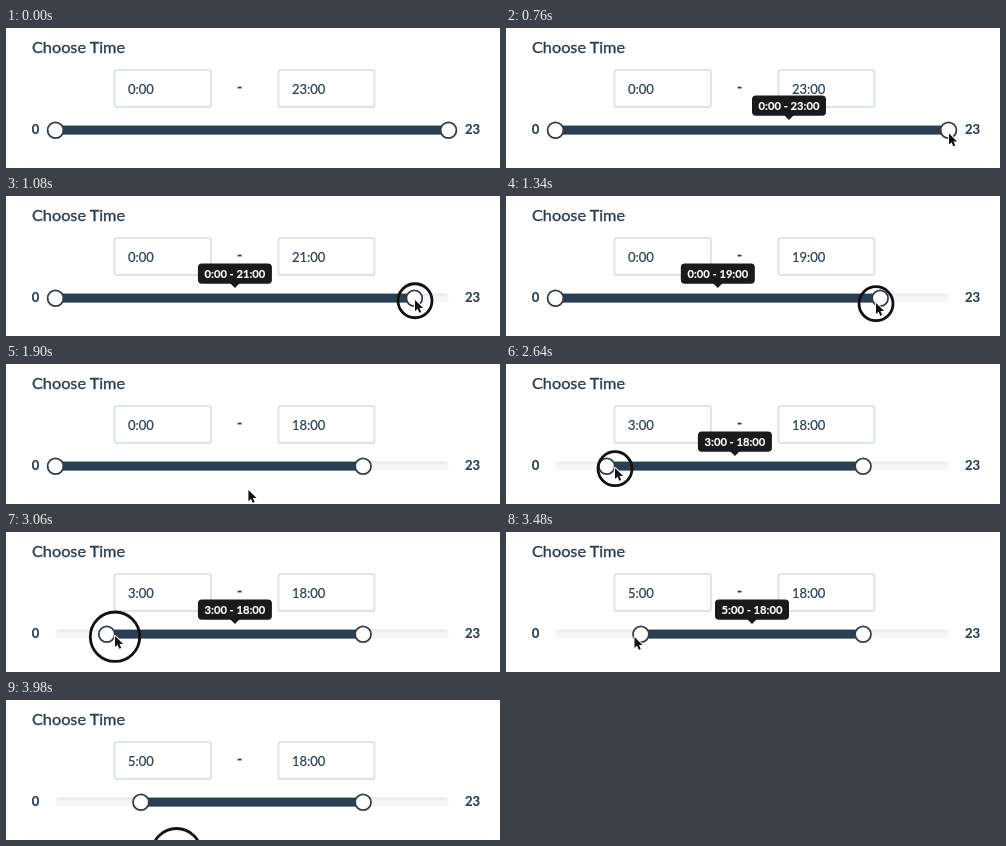
An HTML page for the animation above (4.06 s loop, 494 by 140 pixels).

```html
<!DOCTYPE html>
<html lang="en">
<head>
<meta charset="utf-8">
<title>Choose Time</title>
<style>
  html, body { margin: 0; width: 100%; height: 100%; overflow: hidden; background: #fff; }
  svg { display: block; width: 494px; height: 140px; }
  text { font: 13px Lato, sans-serif; fill: #2c3e50; stroke: #2c3e50; stroke-width: .2; }
  .title { font-size: 16.25px; stroke-width: .35; }
  .bold { font-weight: 700; }
  .field { fill: #fff; stroke: #dbe4e9; stroke-width: 2; }
  .handle { fill: #fff; stroke: #333d47; stroke-width: 1.8; }
  #tip text { font-size: 11.2px; font-weight: 700; fill: #fff; stroke: #fff; text-anchor: middle; }
</style>
</head>
<body>
<svg viewBox="0 0 494 140">
  <defs>
    <linearGradient id="groove" x2="0" y2="1">
      <stop stop-color="#e9e9e9"/>
      <stop offset=".35" stop-color="#f5f5f5"/>
      <stop offset="1" stop-color="#f9f9f9"/>
    </linearGradient>
  </defs>
  <text class="title" x="26" y="25.2">Choose Time</text>
  <rect class="field" x="108.5" y="42" width="96.5" height="37" rx="2.5"/>
  <rect class="field" x="272.5" y="42" width="96" height="37" rx="2.5"/>
  <text id="from" x="122" y="66"></text>
  <text id="to" x="286" y="66"></text>
  <text class="bold" x="231" y="64.3" style="font-size:14px">-</text>
  <text class="bold" x="25.7" y="106">0</text>
  <text class="bold" x="459" y="106">23</text>
  <rect x="49.5" y="97.6" width="393" height="9" rx="4" fill="url(#groove)"/>
  <rect id="range" y="97.6" height="9" fill="#2a4052"/>
  <circle id="low" class="handle" cy="102.3" r="7.9"/>
  <circle id="high" class="handle" cy="102.3" r="7.9"/>
  <g id="tip">
    <path d="M-5 87H5L0 92Z" fill="#1a1a1a"/>
    <rect x="-37" y="67.5" width="74" height="20.3" rx="4" fill="#1a1a1a"/>
    <text id="span" y="81.9"></text>
  </g>
  <g id="pointer">
    <circle id="ring" cx="1" cy="1.7" fill="none" stroke="#111" stroke-width="2.8"/>
    <path transform="translate(1 1) scale(.88)" d="M0 0V12.6L2.9 9.9L4.9 14.5L7.1 13.6L5.1 9.1H9.2Z" fill="#111" stroke="#fff" stroke-width="2.2" stroke-linejoin="round" paint-order="stroke"/>
  </g>
</svg>
<script>
const LOOP = 4060, LEFT = 49.5, STEP = 393 / 23;
const ENTER = 200, FIRST_PRESS = 900;

// Pointer strokes; it rests between them. A dip bows the stroke downwards.
const strokes = [
  { start: ENTER, end: 720, x: 442, y: 104.5 },
  { start: 800, end: FIRST_PRESS, x: 435, y: 101 },
  { start: FIRST_PRESS, end: 1340, x: 369, y: 106 },
  { start: 1340, end: 1560, x: 364.8, y: 106 },
  { start: 1700, end: 2220, x: 44, y: 107, dip: 20 },
  { start: 2240, end: 2640, x: 108, y: 103 },
  { start: 3060, end: 3240, x: 127.5, y: 104 },
  { start: 3480, end: 3720, x: 169.5, y: 151.5 }
];
const presses = [[FIRST_PRESS, 1700], [2300, 3000], [3040, 3480], [3980, LOOP]];

const $ = id => document.getElementById(id);
const clamp = (v, min, max) => Math.min(max, Math.max(min, v));
const mix = (a, b, k) => a + (b - a) * k;
const hour = x => clamp(Math.round((x - LEFT) / STEP), 0, 23);
const place = h => LEFT + h * STEP;
const show = (id, on) => { $(id).style.display = on ? "" : "none"; };

function pointerAt(t) {
  let x = 454, y = 122;
  for (const s of strokes) {
    const k = clamp((t - s.start) / (s.end - s.start), 0, 1);
    x = mix(x, s.x, k);
    y = mix(y, s.y, k) + (s.dip || 0) * Math.sin(Math.PI * k);
  }
  return { x, y };
}

// The ring appears wide, then tightens around the pointer
const ringRadius = age => mix(24.7, 17, clamp((age - 80) / 60, 0, 1));

function draw(t) {
  const p = pointerAt(t);
  const high = hour(pointerAt(Math.min(t, 1560)).x);
  const low = hour(pointerAt(clamp(t, 2240, 3240)).x);
  const x1 = place(low), x2 = place(high);

  $("from").textContent = `${low}:00`;
  $("to").textContent = `${high}:00`;
  $("span").textContent = `${low}:00 - ${high}:00`;
  $("range").setAttribute("x", x1);
  $("range").setAttribute("width", x2 - x1);
  $("low").setAttribute("cx", x1);
  $("high").setAttribute("cx", x2);

  // The tooltip is only centred once the first press has laid it out
  const shift = t < FIRST_PRESS ? 37 : 0;
  $("tip").setAttribute("transform", `translate(${(x1 + x2) / 2 + shift})`);
  show("tip", p.y < 112);

  show("pointer", t >= ENTER);
  $("pointer").setAttribute("transform", `translate(${p.x} ${p.y})`);
  const press = presses.find(([down, up]) => t >= down && t < up);
  show("ring", press);
  if (press) $("ring").setAttribute("r", ringRadius(t - press[0]));
}

const start = performance.now();
function tick() {
  const t = (performance.now() - start) % LOOP;
  draw(Math.floor(t / 20) * 20);
  requestAnimationFrame(tick);
}
tick();
</script>
</body>
</html>
```
